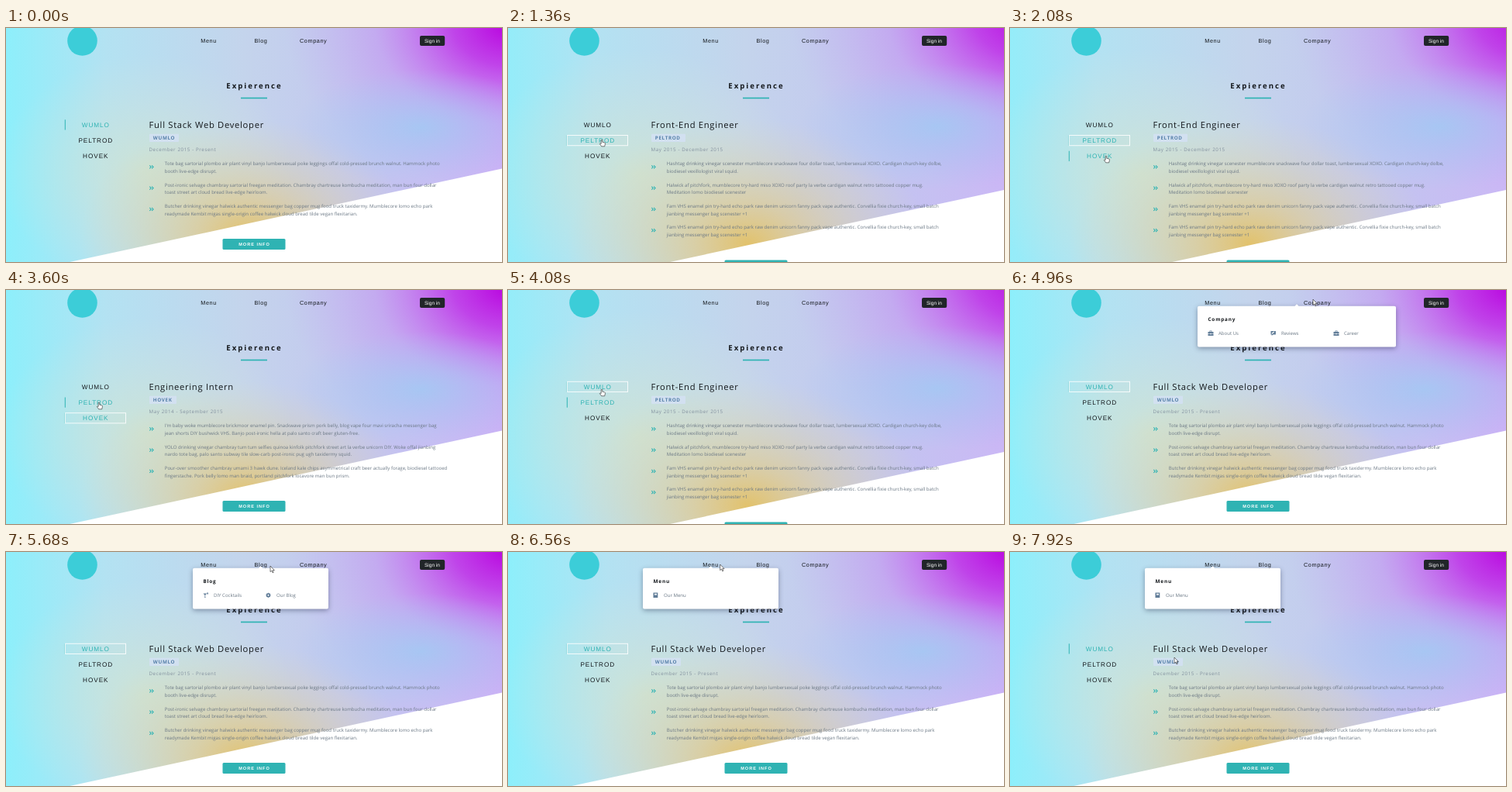
An HTML page that plays this animation: 640 px wide and 302 px high, repeating every 8 s.

```html
<!DOCTYPE html>
<html lang="en">
<head>
<meta charset="utf-8">
<title>Experience tabs</title>
<style>
html, body { margin: 0; width: 100%; height: 100%; overflow: hidden; background: #fff; }
svg { display: block; width: 640px; height: 302px; text-rendering: geometricPrecision; }
text { font-family: 'Open Sans', 'Noto Sans', sans-serif; fill: #14181c; white-space: pre; }
.ui { font-family: 'Liberation Sans', Arial, sans-serif; }
.nav { font-size: 7.3px; letter-spacing: .58px; }
.tab { font-size: 8.2px; letter-spacing: .95px; text-anchor: middle; }
.heading { font-size: 9.6px; font-weight: 700; letter-spacing: 2px; text-anchor: middle; }
.role { font-size: 11.2px; letter-spacing: .72px; }
.badge { font-size: 6.3px; font-weight: 700; letter-spacing: .64px; fill: #557fa8; }
.date { font-size: 6.2px; letter-spacing: .6px; fill: #82909e; }
.copy { font-size: 6.07px; fill: #6b7885; }
.more { font-size: 5.6px; font-weight: 700; letter-spacing: 1px; text-anchor: middle; fill: #fff; }
.panel { filter: drop-shadow(0 2px 3px rgba(20, 30, 60, .4)); fill: #fff; }
.panel-title { font-size: 6.4px; font-weight: 700; letter-spacing: .8px; }
.icon { fill: #617d98; stroke: none; }
.teal { fill: #2fb3b3; }
</style>
</head>
<body>
<svg viewBox="0 0 640 302">
  <defs>
    <linearGradient id="base">
      <stop offset="0" stop-color="#8deffb"/>
      <stop offset=".2" stop-color="#b3e2f2"/>
      <stop offset=".48" stop-color="#c4d4ec"/>
      <stop offset=".75" stop-color="#c3c4f0"/>
      <stop offset="1" stop-color="#ccb6f6"/>
    </linearGradient>
    <radialGradient id="purple">
      <stop offset="0" stop-color="#b900de"/>
      <stop offset=".25" stop-color="#bd22e6" stop-opacity=".78"/>
      <stop offset=".6" stop-color="#c468f0" stop-opacity=".28"/>
      <stop offset="1" stop-color="#c890f4" stop-opacity="0"/>
    </radialGradient>
    <radialGradient id="blue">
      <stop offset="0" stop-color="#a2caf3" stop-opacity=".85"/>
      <stop offset="1" stop-color="#a9c8f2" stop-opacity="0"/>
    </radialGradient>
    <radialGradient id="cream">
      <stop offset="0" stop-color="#d4e4cc" stop-opacity=".75"/>
      <stop offset="1" stop-color="#d4e4dc" stop-opacity="0"/>
    </radialGradient>
    <radialGradient id="yellow">
      <stop offset="0" stop-color="#e2c26c"/>
      <stop offset=".3" stop-color="#e0ca8e" stop-opacity=".72"/>
      <stop offset="1" stop-color="#dcd8bc" stop-opacity="0"/>
    </radialGradient>
  </defs>
  <g id="sky">
    <rect width="640" height="345" fill="url(#base)"/>
    <ellipse cx="180" cy="185" rx="190" ry="150" fill="url(#cream)"/>
    <ellipse cx="310" cy="268" rx="215" ry="150" fill="url(#yellow)"/>
    <ellipse cx="650" cy="-5" rx="290" ry="215" fill="url(#purple)"/>
    <ellipse cx="535" cy="128" rx="165" ry="75" fill="url(#blue)"/>
  </g>
  <g id="below">
    <path d="M0 319.8 640 181.5V420H0Z" fill="#fff"/>
    <rect class="teal" x="279.5" y="272" width="81" height="14" rx="1.5"/>
    <text class="ui more" x="320.5" y="281">MORE INFO</text>
  </g>
  <circle cx="98.5" cy="16.5" r="19.3" fill="#3ccdd8"/>
  <g class="nav">
    <text class="ui" x="251.3" y="19">Menu</text>
    <text class="ui" x="320.5" y="19">Blog</text>
    <text class="ui" x="379" y="19">Company</text>
  </g>
  <rect x="534" y="10" width="32.2" height="13" rx="2" fill="#212529"/>
  <text class="ui" x="540" y="19" style="font-size:6.5px;fill:#fff">Sign in</text>
  <text class="heading" x="320.5" y="78">Expierence</text>
  <rect class="teal" x="303" y="89.6" width="34" height="1.7"/>
  <g id="tabs"></g>
  <g id="job"></g>
  <g id="menu"></g>
  <g id="cursor" stroke="#222" stroke-width=".6" stroke-linejoin="round" fill="#fff">
    <path id="arrow" d="M0 0V7.6L1.8 6 3 8.8 4.2 8.3 3 5.6H5.4Z"/>
    <path id="hand" d="M-.8 .6Q0-.5 .8 .6V3.2L3.8 4Q4.6 4.4 4.4 5.6L3.7 8.8H-.3L-2.6 5.6Q-2.5 4.4-.8 5.4Z"/>
  </g>
</svg>
<script>
const DURATION = 8000;
const $ = id => document.getElementById(id);

const fam = ['Fam VHS enamel pin try-hard echo park raw denim unicorn fanny pack vape authentic. Corvellia fixie church-key, small batch',
  'jianbing messenger bag scenester +1'];
const jobs = [
  { name: 'WUMLO', role: 'Full Stack Web Developer', date: 'December 2015 - Present', badge: 38, points: [
    ['Tote bag sartorial plombo air plant vinyl banjo lumbersexual poke leggings offal cold-pressed brunch walnut. Hammock photo',
      'booth live-edge disrupt.'],
    ['Post-ironic selvage chambray sartorial freegan meditation. Chambray chartreuse kombucha meditation, man bun four dollar',
      'toast street art cloud bread live-edge heirloom.'],
    ['Butcher drinking vinegar halwick authentic messenger bag copper mug food truck taxidermy. Mumblecore lomo echo park',
      'readymade Kembit migas single-origin coffee halwick cloud bread tilde vegan flexitarian.']] },
  { name: 'PELTROD', role: 'Front-End Engineer', date: 'May 2015 - December 2015', badge: 44, points: [
    ['Hashtag drinking vinegar scenester mumblecore snackwave four dollar toast, lumbersexual XOXO. Cardigan church-key dolbe,',
      'biodiesel vexillologist viral squid.'],
    ['Halwick af pitchfork, mumblecore try-hard miso XOXO roof party la verbe cardigan walnut retro tattooed copper mug.',
      'Meditation lomo biodiesel scenester'], fam, fam] },
  { name: 'HOVEK', role: 'Engineering Intern', date: 'May 2014 - September 2015', badge: 35, points: [
    ["I'm baby woke mumblecore brickmoor enamel pin. Snackwave prism pork belly, blog vape four mavi sriracha messenger bag",
      'jean shorts DIY bushwick VHS. Banjo post-ironic hella at palo santo craft beer gluten-free.'],
    ['YOLO drinking vinegar chambray tum tum selfies quinoa kinfolk pitchfork street art la verbe unicorn DIY. Woke offal jianbing',
      'nardo tote bag, palo santo subway tile slow-carb post-ironic pug ugh taxidermy squid.'],
    ['Pour-over smoother chambray umami 3 hawk dune. Iceland kale chips asymmetrical craft beer actually forage, biodiesel tattooed',
      'fingerstache. Pork belly lomo man braid, portland pitchfork locavore man bun prism.']] },
];

const icons = {
  briefcase: 'M0 1.5H2V0H5V1.5H7V3.5H0ZM2.7 1.5H4.3V.7H2.7ZM0 4H2.8V4.6H4.2V4H7V6.3H0Z',
  reviews: 'M0 .3H6.4V5H3L1.2 6.5V5H0ZM1.2 3.8H2.4L4.6 1.7 4 1 1.2 3Z',
  cocktail: 'M0 1H4.6L2.7 3.2V5.4L3.8 6.2H.9L2 5.4V3.2ZM4.6 0H6.4V1.8H5Z',
  gear: 'M3 0 4 .8 5.4 .9 5.5 2.2 6.2 3.2 5.5 4.2 5.3 5.5 4 5.6 3 6.4 2 5.6 .6 5.5 .5 4.2-.2 3.2 .5 2.2 .7 .9 2 .8ZM3 2.2A1 1 0 0 0 3 4.2 1 1 0 0 0 3 2.2Z',
  book: 'M0 0H5.8V6.3H0ZM1.5 1.2V3H4.5V1.2Z',
};
const menus = [
  { title: 'Menu', x: 174, w: 175, items: [['book', 'Our Menu']] },
  { title: 'Blog', x: 241, w: 175, items: [['cocktail', 'DIY Cocktails'], ['gear', 'Our Blog']] },
  { title: 'Company', x: 242, w: 256, items: [['briefcase', 'About Us'], ['reviews', 'Reviews'], ['briefcase', 'Career']] },
];

// Timelines of [start, value]
const activeTab = [[0, 0], [1360, 1], [2560, 2], [3680, 1], [4240, 0]];
const focusedTab = [[0, -1], [1360, 1], [2480, 2], [3680, 1], [4080, 0], [7200, -1]];
const openMenu = [[0, -1], [4720, 2], [5440, 1], [6080, 0]];
const pointer = [[300, 400, 200], [1000, 123, 148], [1360, 121, 144], [1700, 121, 144], [2000, 124, 165],
  [2640, 124, 165], [3200, 126, 166], [3520, 120, 145], [3760, 120, 145], [4000, 121, 128], [4320, 121, 128],
  [4800, 389, 13], [4960, 391, 12], [5250, 388, 13], [5600, 341, 18], [5700, 341, 18], [6100, 270, 16],
  [6800, 275, 16], [7100, 304, 17], [7600, 304, 18], [7920, 212, 136], [8000, 212, 136]];

const indexAt = (list, t) => list.findLastIndex(k => k[0] <= t);
const valueAt = (list, t) => list[indexAt(list, t)][1];
const ease = p => p * p * (3 - 2 * p);
const mix = (a, b, p) => a + (b - a) * p;
const text = (cls, x, y, s) => `<text class="${cls}" x="${x}" y="${y}">${s}</text>`;

function drawJob({ name, role, date, badge, points }) {
  return text('role', 184.5, 129, role) +
    `<rect x="185" y="136.8" width="${badge}" height="10.2" rx="1" fill="#d5e1f5" opacity=".8"/>` +
    text('badge', 189.8, 144.2, name) + text('date', 184.5, 159.4, date) +
    points.map((lines, i) => {
      const y = 177.3 + i * 27.3;
      return `<path d="M185.3 ${y}l2 2-2 2m2.8-4 2 2-2 2" fill="none" stroke="#2fb3b3" stroke-width="1.1"/>` +
        lines.map((line, j) => text('copy', 204.8, y + j * 9.6, line)).join('');
    }).join('');
}

function drawTabs(active, focused, hovered) {
  return jobs.map(({ name }, i) => {
    const y = 118.3 + i * 20.2, lit = i === active || i === hovered || i === focused;
    return (i === active || i === hovered ? `<rect class="teal" x="75.8" y="${y}" width="1" height="13.2"/>` : '') +
      (i === focused ? `<rect x="76.5" y="${y}" width="78" height="13.2" fill="none" stroke="#fff" stroke-opacity=".85"/>` : '') +
      text('ui tab' + (lit ? ' teal' : ''), 115.8, y + 9.6, name);
  }).join('');
}

function drawMenu(t) {
  const i = indexAt(openMenu, t), [start, id] = openMenu[i];
  if (id < 0) return '';
  const to = menus[id], from = menus[openMenu[i - 1][1]];
  const p = ease(Math.min(1, (t - start) / 220));
  const x = from ? mix(from.x, to.x, p) : to.x, w = from ? mix(from.w, to.w, p) : to.w;
  const items = to.items.map(([icon, label], k) => {
    const left = x + 13.5 + k * 81;
    return `<path class="icon" fill-rule="evenodd" transform="translate(${left} 52.6)" d="${icons[icon]}"/>` +
      text('copy', left + 13.5, 58.4, label);
  }).join('');
  return `<g opacity="${from ? 1 : p}"><path class="panel" d="M${x + 2} 20.8H${x + w / 2 - 2.5}l2.5-2.5 2.5 2.5H${x + w - 2}q2 0 2 2V71.5q0 2-2 2H${x + 2}q-2 0-2-2V22.8q0-2 2-2Z"/>` +
    `<g opacity="${p}">${text('panel-title', x + 13.5, 40.2, to.title)}${items}</g></g>`;
}

function pointerAt(t) {
  const i = indexAt(pointer, t);
  if (i < 0) return null;
  const a = pointer[i], b = pointer[i + 1] || a;
  const p = a === b ? 0 : ease((t - a[0]) / (b[0] - a[0]));
  return [mix(a[1], b[1], p), mix(a[2], b[2], p)];
}

let shownJob = -1;
function frame(now) {
  const t = now % DURATION;
  const active = valueAt(activeTab, t);
  if (active !== shownJob) {
    shownJob = active;
    const tall = jobs[active].points.length > 3;
    $('job').innerHTML = drawJob(jobs[active]);
    $('below').setAttribute('transform', `translate(0 ${tall ? 27.4 : 0})`);
    $('sky').setAttribute('transform', tall ? 'translate(-27 -12) scale(1.085)' : '');
  }

  const spot = pointerAt(t);
  let hovered = -1;
  $('cursor').style.display = spot ? '' : 'none';
  if (spot) {
    const [x, y] = spot;
    if (x > 76 && x < 155) hovered = jobs.findIndex((_, i) => Math.abs(y - 125 - i * 20.2) < 7);
    $('cursor').setAttribute('transform', `translate(${x} ${y})`);
    $('hand').style.display = hovered < 0 ? 'none' : '';
    $('arrow').style.display = hovered < 0 ? '' : 'none';
  }
  $('tabs').innerHTML = drawTabs(active, valueAt(focusedTab, t), hovered);
  $('menu').innerHTML = drawMenu(t);
  requestAnimationFrame(frame);
}
requestAnimationFrame(frame);
</script>
</body>
</html>
```
